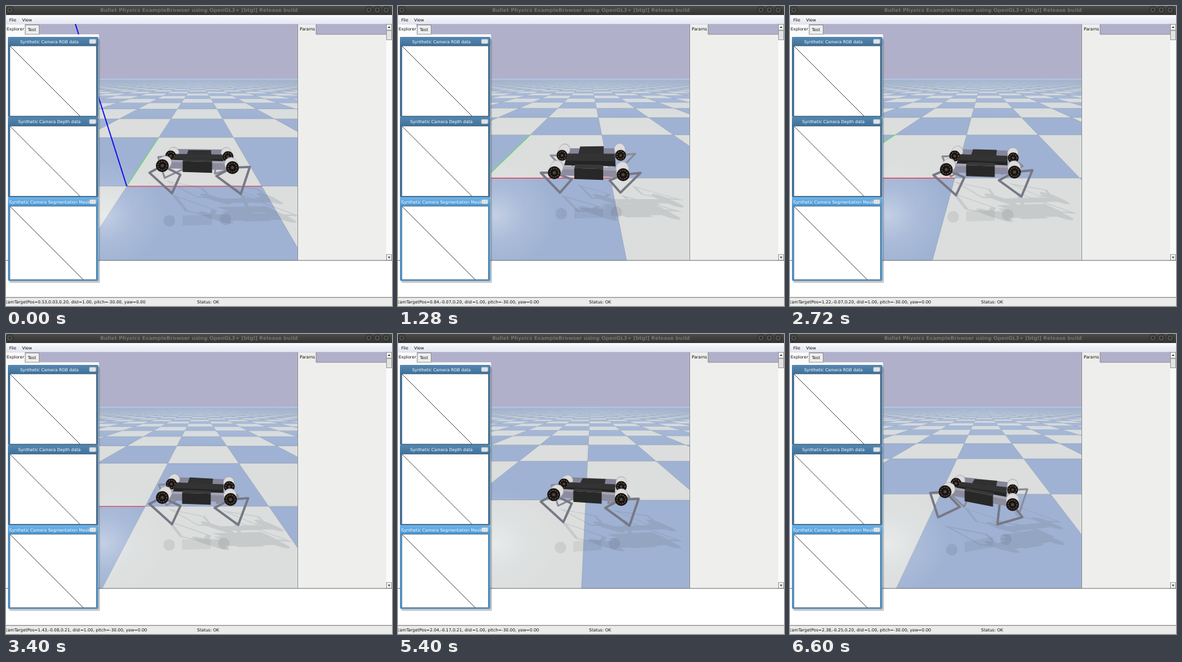
These frames come from a looping animation (600x466 px, 6.68 s). An HTML page:

```html
<!DOCTYPE html>
<html lang="en">
<head>
<meta charset="utf-8">
<title>Physics browser</title>
<style>
  html, body { margin: 0; width: 100%; height: 100%; overflow: hidden; background: #fff; }
  svg { display: block; width: 600px; height: 466px; }
  text { font: 6.5px "DejaVu Sans", sans-serif; fill: #111; white-space: pre; }
</style>
</head>
<body>
<svg viewBox="0 0 600 466" xmlns="http://www.w3.org/2000/svg">
  <defs>
    <linearGradient id="haze" x2="0" y2="1">
      <stop offset="0" stop-color="#b4cbec" stop-opacity=".85"/>
      <stop offset=".25" stop-color="#bccfeb" stop-opacity=".35"/>
      <stop offset="1" stop-color="#c4d0e6" stop-opacity="0"/>
    </linearGradient>
    <radialGradient id="shine">
      <stop offset="0" stop-color="#fff" stop-opacity=".38"/>
      <stop offset=".5" stop-color="#f4f8ff" stop-opacity=".13"/>
      <stop offset="1" stop-color="#fff" stop-opacity="0"/>
    </radialGradient>
    <linearGradient id="bar" x2="0" y2="1">
      <stop offset="0" stop-color="#4a4a48"/><stop offset="1" stop-color="#343432"/>
    </linearGradient>
    <linearGradient id="menu" x2="0" y2="1">
      <stop offset="0" stop-color="#fbfbfd"/><stop offset="1" stop-color="#e2e5f0"/>
    </linearGradient>
    <linearGradient id="idle" x2="0" y2="1">
      <stop offset="0" stop-color="#5688b0"/><stop offset="1" stop-color="#3f729c"/>
    </linearGradient>
    <linearGradient id="active" x2="0" y2="1">
      <stop offset="0" stop-color="#6fb4ea"/><stop offset="1" stop-color="#4a97d3"/>
    </linearGradient>
    <filter id="flat" x="-10%" y="-10%" width="120%" height="120%">
      <feColorMatrix values="0 0 0 0 .1  0 0 0 0 .11  0 0 0 0 .14  0 0 0 1 0"/>
      <feGaussianBlur stdDeviation=".5"/>
    </filter>
    <clipPath id="view"><rect x="144" y="28" width="310" height="367"/></clipPath>
  </defs>

  <rect y="28" width="600" height="367" fill="#b1b0cb"/>
  <g clip-path="url(#view)">
    <rect x="144" y="113" width="310" height="283" fill="#9fb2d3"/>
    <path id="floor" fill="#dbdedd" stroke="#666" stroke-opacity=".4" stroke-width=".5"/>
    <rect x="144" y="113" width="310" height="60" fill="url(#haze)"/>
    <ellipse cx="152" cy="325" rx="95" ry="85" fill="url(#shine)"/>
    <path id="axisX" stroke="#e8304a" stroke-width="1.1"/>
    <path id="axisY" stroke="#5fe05f" stroke-width="1.1"/>
    <g id="mirror" opacity=".07"></g>
    <g id="shadow" opacity=".15" filter="url(#flat)"></g>
    <g id="robot" stroke-linecap="round" stroke-linejoin="round">
      <g id="far"></g><g id="trunk"></g><g id="near"></g>
    </g>
  </g>
  <path id="axisZ" stroke="#0808ee" stroke-width="1.7"/>
  <g id="ui"></g>
  <text id="camera" x="-1" y="461.8"></text>
</svg>
<script>
const LOOP = 6680, TICK = 40;
const CENTER = [299, 240.5], FOCAL = 225.5, COS = Math.cos(Math.PI / 6), SIN = 0.5;
const STRIDE = 5.07; // steps per gait cycle
const KEYS = [0, 19, 41, 51, 65, 81, 99];
const byId = id => document.getElementById(id);
const f = v => v.toFixed(2);

// ---------- motion ----------
const gait = n => Math.cos(2 * Math.PI * n / STRIDE);

// Follows a gait model exactly while drifting through the key values.
function track(values, square = 0, linear = 0) {
  const model = n => square * gait(n) ** 2 + linear * gait(n);
  const rest = values.map((v, i) => v - model(KEYS[i]));
  return n => {
    let i = 0;
    while (i < KEYS.length - 2 && n >= KEYS[i + 1]) i++;
    const k = (n - KEYS[i]) / (KEYS[i + 1] - KEYS[i]);
    return model(n) + rest[i] + (rest[i + 1] - rest[i]) * k;
  };
}

const target = [
  track([.53, .84, 1.22, 1.43, 1.67, 2.04, 2.38]),
  track([.03, -.07, -.07, -.08, -.16, -.17, -.25]),
  track([.20, .20, .20, .21, .20, .21, .20])
];
const hips = {
  nearRear: [track([243, 243, 243, 243, 243, 242, 241]), track([248, 259, 254, 254, 257, 249.5, 245], -9, 1.5)],
  nearFront: [track([352, 350, 349, 349, 347, 347, 346]), track([251, 262, 258, 257, 265, 257, 265], -2, -3)],
  farRear: [track([256, 255, 256, 257, 256, 258, 258]), track([233, 232, 233, 233, 231, 233, 232], 1.5)],
  farFront: [track([345, 346, 347, 347, 347, 347, 346]), track([234, 232, 236, 237, 236, 237, 242], 2, -2)]
};

// Leg poses relative to the hip: left knee, foot, right knee.
const rearPose = {
  back: [-23, 2, -11, 40, 23, 24], mid: [-21, 0, 9, 31, 27, 10], fore: [-20, 11, 15, 43, 28, 14]
};
const frontPose = {
  back: [-20, -2, -24, 31, 15, 20], mid: [-21, 9, -4, 28, 27, -3], fore: [-25, 13, 13, 41, 27, -1]
};
const bend = ({back, mid, fore}, c) => mid.map((m, i) =>
  m + c * (fore[i] - back[i]) / 2 + c * c * ((fore[i] + back[i]) / 2 - m));

// ---------- drawing ----------
const poly = (points, fill) =>
  `<path d="M${points.map(p => p.map(f)).join('L')}Z" fill="${fill}"/>`;

function leg([x, y], pose, c, size, width, color) {
  const [ax, ay, bx, by, cx, cy] = bend(pose, c).map((v, i) => f(v * size + (i % 2 ? y : x)));
  return `<path d="M${f(x)},${f(y)}L${ax},${ay}L${bx},${by}L${cx},${cy}Z" fill="none" stroke="${color}" stroke-width="${width}"/>`;
}

function motor([x, y], [dx, dy], r) {
  const disc = (radius, look) => `<circle cx="${f(x)}" cy="${f(y)}" r="${radius}" ${look}/>`;
  return `<path d="M${f(x)},${f(y)}l${f(dx * .36)},${f(dy * .36)}" stroke="#a9a9ae" stroke-width="${2 * r}"/>` +
    `<path d="M${f(x + dx * .24)},${f(y + dy * .24)}l${f(dx * .1)},${f(dy * .1)}" stroke="#dcdcdc" stroke-width="${2 * r - 1}"/>` +
    disc(r, 'fill="#171412"') +
    disc(r * .68, 'fill="none" stroke="#80604e" stroke-width="1.2" stroke-dasharray="1.2 2.6"') +
    disc(r * .25, 'fill="#4a4644"');
}

function drawRobot(n) {
  const at = name => hips[name].map(g => g(n));
  const [nr, nf, fr, ff] = ['nearRear', 'nearFront', 'farRear', 'farFront'].map(at);
  const c = gait(n);
  const mix = (a, b, k) => a.map((v, i) => v + (b[i] - v) * k);
  // u runs rear to front, v near to far, lift is upward
  const point = (u, v, lift) => {
    const [x, y] = mix(mix(nr, nf, u), mix(fr, ff, u), v);
    return [x, y - lift];
  };
  const slab = (u0, u1, v0, lift0, v1, lift1, fill) => poly([
    point(u0, v0, lift0), point(u1, v0, lift0), point(u1, v1, lift1), point(u0, v1, lift1)], fill);
  const depthRear = [fr[0] - nr[0], fr[1] - nr[1]];
  const depthFront = [ff[0] - nf[0], ff[1] - nf[1]];

  byId('far').innerHTML =
    leg(fr, rearPose, -c, .85, 2.8, '#8b8b96') +
    leg(ff, frontPose, -c, .85, 2.8, '#8b8b96') +
    slab(.05, .95, 1, 2, 1, 11, '#85859a') +
    motor(fr, depthRear, 8.5) + motor(ff, depthFront, 8.5) +
    slab(.28, .71, 1, 2, 1.35, 4, '#303030');
  byId('trunk').innerHTML =
    slab(.1, .9, .43, 0, .7, 2, '#242424') +
    slab(.1, .9, .62, 2, .95, 4, '#333');
  byId('near').innerHTML =
    leg(nr, rearPose, c, 1, 3.6, '#777784') +
    leg(nf, frontPose, c, 1, 3.6, '#777784') +
    slab(.04, .96, 0, -4, 0, 8, '#8c8c9e') +
    slab(.04, .96, 0, 6, .1, 8, '#a5a5b4') +
    motor(nr, depthRear, 10) + motor(nf, depthFront, 10) +
    slab(.29, .71, 0, -9, 0, 8, '#282828') +
    slab(.29, .71, 0, 8, .22, 8, '#383838');

  const flip = ([x, y]) => [x, 582 - y];
  const ghost = [[.29, -8], [.71, -8], [.71, 8], [.29, 8]].map(([u, lift]) => flip(point(u, 0, lift)));
  byId('mirror').innerHTML = poly(ghost, '#333') + [mix(nr, nf, .1), mix(nr, nf, .9)].map(flip)
    .map(([x, y]) => `<circle cx="${f(x)}" cy="${f(y)}" r="9"/>`).join('');
}

function drawWorld([tx, ty, tz]) {
  const depthOf = (y, z) => Math.max(y - ty + COS, .1) * COS - (z - tz - SIN) * SIN;
  const project = (x, y, z = 0) => {
    const dy = Math.max(y - ty + COS, .1), depth = depthOf(y, z);
    const up = dy * SIN + (z - tz - SIN) * COS;
    return f(CENTER[0] + FOCAL * (x - tx) / depth) + ',' + f(CENTER[1] - FOCAL * up / depth);
  };
  let d = '';
  const first = Math.floor(ty - COS);
  for (let y = first; y < first + 46; y++) {
    const half = 160 * depthOf(y + 1, 0) / FOCAL;
    for (let x = Math.floor(tx - half); x < tx + half; x++) {
      if ((x + y) % 2) continue;
      d += `M${project(x, y)}L${project(x + 1, y)}L${project(x + 1, y + 1)}L${project(x, y + 1)}Z`;
    }
  }
  byId('floor').setAttribute('d', d);
  const axis = (id, ...end) => byId(id).setAttribute('d', `M${project(0, 0)}L${project(...end)}`);
  axis('axisX', 1, 0);
  axis('axisY', 0, 1);
  axis('axisZ', 0, 0, 1);
}

// Each layer is cast from its own ground line, rightwards and towards the viewer.
const cast = (id, ground, right = 1.7, down = .75) =>
  `<use href="#${id}" stroke-linecap="round" transform="matrix(1 0 ${-right} ${-down} ${right * ground} ${(1 + down) * ground})"/>`;
byId('shadow').innerHTML = cast('far', 270) + cast('trunk', 282) + cast('near', 293);

// ---------- window chrome ----------
const rect = (x, y, w, h, fill, more = '') =>
  `<rect x="${x}" y="${y}" width="${w}" height="${h}" fill="${fill}" ${more}/>`;
const label = (x, y, s, more = '') => `<text x="${x}" y="${y}" ${more}>${s}</text>`;
const edge = 'stroke="#777" stroke-width=".7"';

function cameraWindow(y, h, title, look, border) {
  const size = h - 16;
  return rect(5, y + 3, 141, h, '#000', 'opacity=".22" rx="2"') +
    rect(3, y, 140.5, h, border, 'rx="2"') +
    rect(3, y, 140.5, 13.5, `url(#${look})`, 'rx="2"') +
    rect(6, y + 14, 134.5, size, '#fff', 'stroke="#345" stroke-width=".6"') +
    `<path d="M6,${y + 14}l${size},${size}" stroke="#222" stroke-width=".8"/>` +
    label(67.5, y + 9.5, title, 'text-anchor="middle" style="fill:#fff"') +
    rect(129.5, y + 3.5, 10.5, 7, '#dfe3e6', 'rx="1.5" stroke="#8fa5b5" stroke-width=".6"');
}

function scrollButton(y, tip) {
  return rect(591.5, y, 8, 9, '#f4f4f4', edge) +
    `<path d="M593.5,${y + 4.5 - tip}h4l-2,${2.5 * tip}z" fill="#222"/>`;
}

byId('ui').innerHTML =
  rect(0, 0, 600, 14, 'url(#bar)') +
  [6, 564, 577, 591].map(x =>
    `<circle cx="${x}" cy="6" r="5.2" fill="#4d4d4b" stroke="#222" stroke-width="1"/><circle cx="${x}" cy="6" r="1.8" fill="#2b2b2a"/>`).join('') +
  label(300, 9.3, 'Bullet Physics ExampleBrowser using OpenGL3+ [btgl] Release build',
    'text-anchor="middle" style="font-size:7.93px;font-weight:bold;fill:#72726f"') +
  rect(0, 14, 600, 14, 'url(#menu)') + label(5, 23.6, 'File') + label(25, 23.6, 'View') +
  rect(0, 44, 144.5, 351, '#fbfbfb') +
  rect(0, 28.3, 29.5, 16.5, '#fbfbfb') + label(1, 38.3, 'Explorer') +
  rect(30, 29.5, 21.5, 14.5, '#eee', edge) + label(34, 39, 'Test') +
  rect(453.5, 44, 138, 351, '#eeeeec') +
  rect(453.5, 28.3, 28.5, 16.5, '#eeeeec') + label(456.5, 38.3, 'Params') +
  `<path d="M453.5,28.5V395M482,28.5V44H591" fill="none" ${edge}/>` +
  rect(591, 28, 9, 367, '#fafafa') + scrollButton(28.4, -1) + scrollButton(386, 1) +
  rect(591.5, 38, 8, 14.5, '#e4e4e4', edge) +
  rect(0, 395, 600, 58, '#fff') + rect(0, 453, 600, 13, '#ebebea') +
  `<path d="M0,395.2H600M0,452.7H600" stroke="#666" stroke-width=".9"/>` +
  cameraWindow(48, 125, 'Synthetic Camera RGB data', 'idle', '#42759d') +
  cameraWindow(172.5, 125, 'Synthetic Camera Depth data', 'idle', '#42759d') +
  cameraWindow(297, 130, 'Synthetic Camera Segmentation Mask', 'active', '#4f96cf') +
  label(297, 461.8, 'Status: OK');

// ---------- clock ----------
let shown = -1;
const start = performance.now();

function frame(now) {
  const time = Math.max(0, now - start) % LOOP;
  // 15 steps a second, held on a 40 ms grid
  const n = Math.min(99, Math.floor((Math.floor(time / TICK) + .5) * .6));
  if (n !== shown) {
    shown = n;
    const pos = target.map(g => g(n));
    drawWorld(pos);
    drawRobot(n);
    byId('camera').textContent =
      `camTargetPos=${pos.map(f).join(',')}, dist=1.00, pitch=-30.00, yaw=0.00`;
  }
  requestAnimationFrame(frame);
}
frame(start);
</script>
</body>
</html>
```
